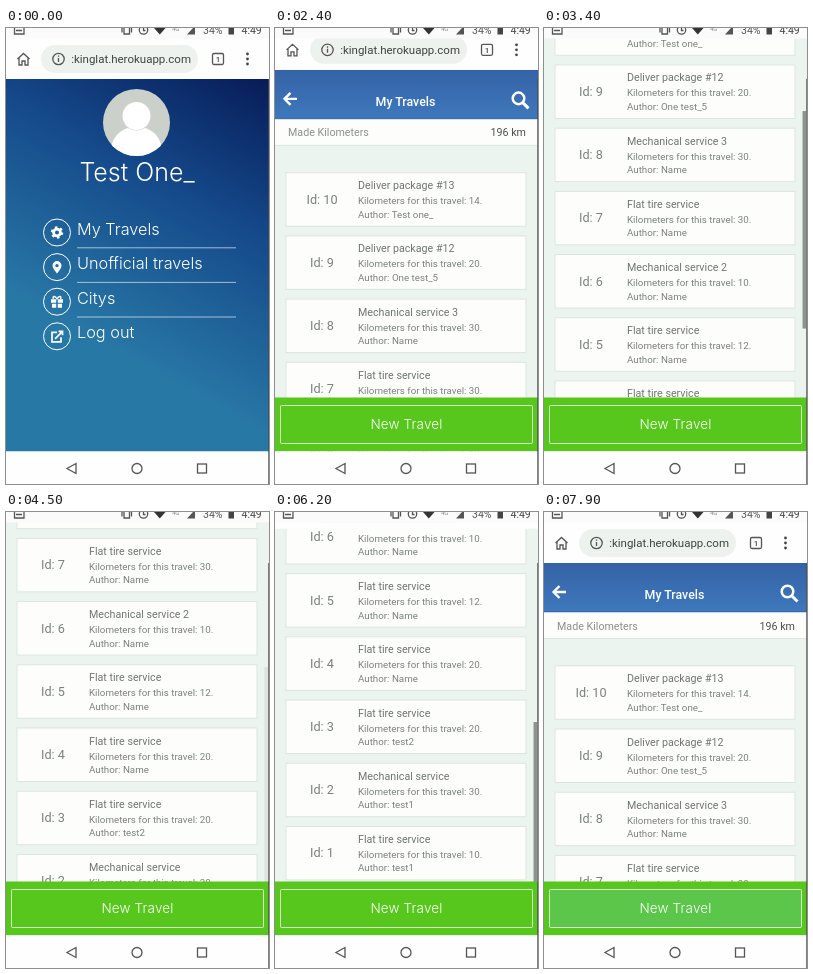
Write an HTML page that moves like this. It is 263x456 px and loops after 8000 ms.

```html
<!DOCTYPE html>
<html lang="en">
<head>
<meta charset="utf-8">
<title>Travel log</title>
<style>
  html, body { margin: 0; width: 100%; height: 100%; overflow: hidden; background: #fdfefd; }
  svg { display: block; width: 100vw; height: 100vh; }
  text { font-family: Roboto, sans-serif; white-space: pre; }
  .light { font-family: Inter, sans-serif; font-weight: 300; fill: #fff; }
  .line { fill: none; stroke: #fff; }
  .icon { fill: none; stroke: #555; stroke-width: 1.3; }
</style>
</head>
<body>
<svg viewBox="0 0 263 456" xmlns="http://www.w3.org/2000/svg">
  <defs>
    <linearGradient id="night" gradientUnits="userSpaceOnUse" x1="263" y1="51" x2="110" y2="325">
      <stop offset="0" stop-color="#071c58"/>
      <stop offset=".45" stop-color="#15498a"/>
      <stop offset="1" stop-color="#2878a6"/>
    </linearGradient>
    <linearGradient id="head" x1="0" y1="0" x2="0" y2="1">
      <stop offset="0" stop-color="#3562a6"/>
      <stop offset="1" stop-color="#3e78bc"/>
    </linearGradient>
    <clipPath id="view"><rect y="10" width="263" height="413.5"/></clipPath>
    <clipPath id="face"><circle cx="130.5" cy="94.5" r="33.5"/></clipPath>
  </defs>

  <g id="menu">
    <rect y="51" width="263" height="372.5" fill="url(#night)"/>
    <g clip-path="url(#face)">
      <rect x="97" y="61" width="67" height="67" fill="#cbd0cb"/>
      <circle cx="130.5" cy="88" r="14" fill="#fff"/>
      <path d="M104 130C104 110 113 103 122 100Q130.500 105 139 100C148 103 157 110 157 130Z" fill="#fff"/>
    </g>
    <text class="light" x="131" y="153" font-size="25" text-anchor="middle">Test One_</text>
    <g id="items"></g>
  </g>

  <g id="travels" clip-path="url(#view)">
    <rect y="10" width="263" height="414" fill="#ecf4ef"/>
    <g id="page">
      <rect y="99" width="263" height="27" fill="#fdfefc"/>
      <rect y="126" width="263" height="1" fill="#dde6e1"/>
      <text x="13" y="117.500" font-size="10.700" fill="#8b908d">Made Kilometers</text>
      <text x="251" y="117.500" font-size="10.700" fill="#4d504e" text-anchor="end">196 km</text>
      <rect y="51" width="263" height="49" fill="url(#head)"/>
      <rect y="99" width="263" height="1.500" fill="#2f5c98" opacity=".5"/>
      <path class="line" d="M22 80H10M15.500 74L9.500 80L15.500 86" stroke-width="2.400"/>
      <text x="130.500" y="87" font-size="12.400" font-weight="500" fill="#fff" text-anchor="middle">My Travels</text>
      <circle class="line" cx="243.500" cy="79.500" r="5.800" stroke-width="2.500"/>
      <path class="line" d="M247.500 83.500L253.500 89.500" stroke-width="3"/>
      <g id="cards"></g>
    </g>
    <rect id="thumb" x="258.500" width="3.500" fill="#8f9390"/>
    <rect y="369.500" width="263" height="54" fill="#57c61d"/>
    <rect id="press" x="5.500" y="377.500" width="252" height="38" fill="#5bc64a"/>
    <rect class="line" x="5.500" y="377.500" width="252" height="38" rx="1" stroke="#fff" opacity=".75"/>
    <text class="light" x="131.500" y="401" font-size="13.500" letter-spacing=".15" text-anchor="middle">New Travel</text>
    <ellipse id="glow" cx="131" cy="424" rx="124" ry="22" fill="#777"/>
  </g>

  <g id="bar">
    <rect y="10" width="263" height="41" fill="#fdfefd"/>
    <path class="icon" d="M11.500 31L17.500 25.500L23.500 31M13 30V37H16V33H19V37H22V30"/>
    <rect x="35" y="17" width="157" height="28" rx="14" fill="#eef2ef"/>
    <circle class="icon" cx="52.500" cy="31" r="5.700"/>
    <path class="icon" d="M52.500 30V34M52.500 27.500V28.800"/>
    <text x="185" y="35" font-size="11.500" fill="#3f4341" text-anchor="end">:kinglat.herokuapp.com</text>
    <rect class="icon" x="206.500" y="25.500" width="11" height="11" rx="1.500"/>
    <text x="212" y="34" font-size="8" font-weight="500" fill="#444" text-anchor="middle">1</text>
    <g fill="#444"><circle cx="241.500" cy="26" r="1.400"/><circle cx="241.500" cy="31" r="1.400"/><circle cx="241.500" cy="36" r="1.400"/></g>
  </g>

  <g id="status">
    <rect width="263" height="10.500" fill="#fafbfa"/>
    <path class="icon" d="M8.500 0V6H18V0M10 2.500H16" stroke-width="1"/>
    <path class="icon" d="M118 0V6H123.500V0M116 0V4.500M125.500 0V4.500" stroke-width="1"/>
    <circle class="icon" cx="137.500" cy="2" r="4.200" stroke-width="1"/>
    <path class="icon" d="M137.500 0V2.500H139.500" stroke-width="1"/>
    <path d="M148 0H159.500L153.800 6.500Z" fill="#333"/>
    <text x="166" y="3" font-size="6" fill="#888">4G</text>
    <path d="M181 6.500H189V0H187Z" fill="#555"/>
    <text x="197" y="6" font-size="10.500" fill="#555">34%</text>
    <rect x="222.500" width="5.500" height="6.500" fill="#444"/>
    <text x="235.500" y="6" font-size="10.500" fill="#444">4:49</text>
  </g>

  <g>
    <rect y="423.500" width="263" height="33" fill="#fdfefd"/>
    <path class="icon" d="M70 435.500V445.500L61 440.500Z" stroke-width="1" stroke="#777"/>
    <circle class="icon" cx="131" cy="440.500" r="5" stroke-width="1"/>
    <rect class="icon" x="191.500" y="436" width="9" height="9" stroke-width="1"/>
  </g>
  <rect x="262" y="51" width="1" height="405" fill="#4a4e4c" opacity=".7"/>
</svg>
<script>
const LOOP = 8000, BAR = 41, MAX = 374, PAGE = 788;
const $ = id => document.getElementById(id);
const clamp = (v, lo = 0, hi = 1) => Math.min(hi, Math.max(lo, v));

const gear = `<circle r="3.400" class="line" stroke-width="2.800"/>
  <circle r="5.200" class="line" stroke-width="2" stroke-dasharray="2.500 2.945"/>`;
const pin = `<path d="M0 6.500C-2 3.500-4.500 1.500-4.500-1.500A4.500 4.500 0 0 1 4.500-1.500C4.500 1.500 2 3.500 0 6.500ZM0-3.200A1.700 1.700 0 1 0 0 .2A1.700 1.700 0 1 0 0-3.200Z" fill="#fff" fill-rule="evenodd"/>`;
const gift = `<path d="M-6-2.500H-.8V1H-6ZM.8-2.500H6V1H.8ZM-5 2H-.8V6H-5ZM.8 2H5V6H.8Z" fill="#fff"/>
  <path class="line" d="M0-2.500C-2-7-5-5-3.500-2.800M0-2.500C2-7 5-5 3.500-2.800" stroke-width="1.400"/>`;
const leave = `<path class="line" d="M0-4H-5V5.500H4V1M-2 2.500L5-4.500M1.500-5H5.500V-1" stroke-width="1.700"/>`;

$("items").innerHTML = [["My Travels", gear], ["Unofficial travels", pin], ["Citys", gift], ["Log out", leave]]
  .map(([label, icon], i) => {
    const y = 204.5 + i * 34.6;
    return `<circle class="line" cx="51" cy="${y}" r="13.500"/>
      <g transform="translate(51 ${y})">${icon}</g>
      <text class="light" x="71" y="${y + 2}" font-size="16.300">${label}</text>` +
      (i < 3 ? `<path class="line" d="M71 ${y + 15.3}H230" opacity=".6"/>` : "");
  }).join("");

const flat = "Flat tire service", mech = "Mechanical service";
const travels = [
  ["Deliver package #13", 14, "Test one_"], ["Deliver package #12", 20, "One test_5"],
  [mech + " 3", 30, "Name"], [flat, 30, "Name"], [mech + " 2", 10, "Name"],
  [flat, 12, "Name"], [flat, 20, "Name"], [flat, 20, "test2"], [mech, 30, "test1"], [flat, 10, "test1"]
];
$("cards").innerHTML = travels.map(([title, km, author], i) => `
  <g transform="translate(0 ${153.3 + i * 63.2})" fill="#7b817e">
    <rect x="11" y=".5" width="240" height="53.500" fill="#fdfefc" stroke="#dbe5e0"/>
    <text x="47" y="31.500" font-size="12.700" text-anchor="middle">Id: ${10 - i}</text>
    <text x="83" y="17" font-size="10.700" fill="#6f7572">${title}</text>
    <text x="83" y="32" font-size="9.750">Kilometers for this travel: ${km}.</text>
    <text x="83" y="45.500" font-size="9.750">Author: ${author}</text>
  </g>`).join("");

// Finger travel: [ms, distance]
const drag = [
  [2300, 0], [2400, 9], [2700, 75], [3000, 135], [3400, 180], [3600, 186], [3700, 186],
  [3900, 262], [4100, 317], [4600, 317], [5000, 347], [5300, 389], [5450, 415],
  [6120, 415], [6300, 388], [6500, 285], [6800, 68.5], [7000, 0]
];

// Monotone cubic through the drag points
function distance(t) {
  const last = drag.length - 1;
  if (t <= drag[0][0] || t >= drag[last][0]) return 0;
  const slope = i => i < 0 || i >= last ? 0 : (drag[i + 1][1] - drag[i][1]) / (drag[i + 1][0] - drag[i][0]);
  const tangent = i => {
    const a = slope(i - 1), b = slope(i);
    return a * b > 0 ? 2 * a * b / (a + b) : 0;
  };
  const i = drag.findIndex(p => p[0] > t) - 1;
  const [t0, d0] = drag[i], [t1, d1] = drag[i + 1];
  const h = t1 - t0, u = (t - t0) / h, v = 1 - u;
  return d0 * v * v * (1 + 2 * u) + d1 * u * u * (3 - 2 * u) + h * u * v * (tangent(i) * v - tangent(i + 1) * u);
}

const thumbTimes = [[2450, 4250], [4650, 5600], [6200, 7150]];
const thumbAlpha = t => Math.max(...thumbTimes.map(([a, b]) => t < a ? 0 : clamp((b + 300 - t) / 300)));

function draw(t) {
  const d = distance(t);
  const bar = t < 6100 ? Math.max(0, BAR - d) : Math.min(BAR, BAR + MAX - d);
  const scroll = d - BAR + bar;
  const view = 414 - bar;

  $("menu").style.display = t < 900 ? "" : "none";
  $("travels").style.display = t < 900 ? "none" : "";
  $("cards").style.display = t < 1000 ? "none" : "";
  $("bar").setAttribute("transform", `translate(0 ${bar - BAR})`);
  $("page").setAttribute("transform", `translate(0 ${-d})`);

  const thumb = $("thumb");
  thumb.setAttribute("y", 10 + bar + scroll * view / PAGE);
  thumb.setAttribute("height", view * view / PAGE);
  thumb.setAttribute("opacity", thumbAlpha(t));

  $("glow").setAttribute("opacity", .14 * clamp((t - 5420) / 80) * clamp((6000 - t) / 400));
  $("press").setAttribute("opacity", clamp((t - 7620) / 280));
}

const start = performance.now();
function tick() {
  draw((performance.now() - start) % LOOP);
  requestAnimationFrame(tick);
}
tick();
</script>
</body>
</html>
```
